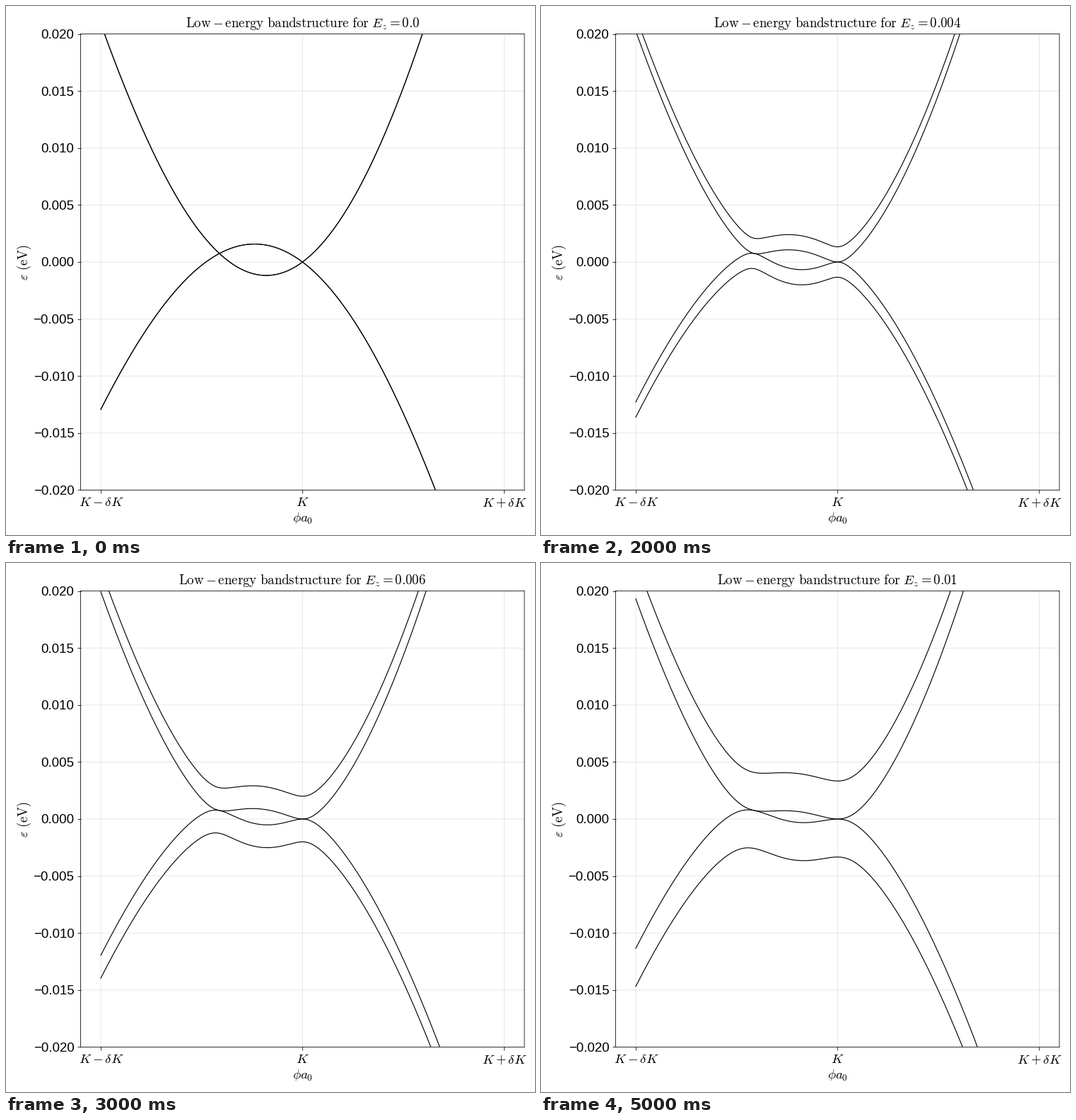
A matplotlib script for the animation above (6 s loop, 748 px wide and 748 px high).

```python
import numpy as np
import matplotlib.pyplot as plt
from matplotlib.animation import FuncAnimation

SIZE, DPI = 748, 100
LEFT, RIGHT, TOP, BOTTOM = 105.5, 733, 39.6, 684.4
MID = (LEFT + RIGHT) / 2
PX = 72 / DPI
FONT = 18.7 * PX
THIN = 0.8 * PX

plt.rcParams["font.family"] = "Liberation Sans"
plt.rcParams["mathtext.fontset"] = "cm"

fig = plt.figure(figsize=(SIZE / DPI, SIZE / DPI), dpi=DPI, facecolor="white")
ax = fig.add_axes([LEFT / SIZE, 1 - BOTTOM / SIZE,
                   (RIGHT - LEFT) / SIZE, (BOTTOM - TOP) / SIZE])
ax.set_xlim(-1.1, 1.1)
ax.set_ylim(-0.02, 0.02)


def label(x, y, text, **kw):
    """Text at a pixel position measured from the top left corner."""
    style = dict(fontsize=FONT, ha="center", va="baseline") | kw
    return fig.text(x / SIZE, 1 - y / SIZE, text, **style)


levels = np.linspace(-0.02, 0.02, 9).round(3) + 0.0
ax.set_xticks([-1, 0, 1], [""] * 3)
ax.set_yticks(levels, [f"{v:.3f}".replace("-", "\u2212") for v in levels])
ax.tick_params(length=5 * PX, width=THIN, pad=4.2 * PX, labelsize=FONT)
ax.grid(color="black", alpha=0.12, linewidth=THIN)
ax.set_axisbelow(True)
for line in [*ax.get_xgridlines(), *ax.get_ygridlines(), *ax.spines.values()]:
    line.set_snap(False)
    line.set_linewidth(THIN)

step = (RIGHT - LEFT) / 2.2
label(MID - step + 0.5, 707.4, r"$K-\delta K$")
label(MID, 707.4, "$K$")
label(MID + step, 707.4, r"$K+\delta K$")
label(MID, 729.4, r"$\phi a_0$")
label(25.5, 362, r"$\varepsilon\ \mathrm{(eV)}$", rotation=90, va="center")
title = label(MID, 30, "", fontsize=18.8 * PX)

# Conduction and valence bands without a field, as polynomials around K
k = np.linspace(-1, 1, 801)
upper = np.polyval([-54.5, -16.3, 586.6, 211.4, 0], k) / 16125
lower = np.polyval([43.7, 17.7, -448.5, -214, 0], k) / 16125
centre, gap = (upper + lower) / 2, (upper - lower) / 2

bands = [ax.plot([], [], color="black", lw=1.15 * PX)[0] for _ in range(4)]
SIGNS = [(1, 1), (1, -1), (-1, 1), (-1, -1)]


def draw(i):
    field = round(0.002 * i, 3)
    split = field / 6
    root = np.hypot(gap, split)
    for line, (s, r) in zip(bands, SIGNS):
        line.set_data(k, centre + s * split + r * root)
    title.set_text(r"$\mathrm{Low-energy\ bandstructure\ for\ }E_z=%s$" % field)
    return [*bands, title]


anim = FuncAnimation(fig, draw, frames=6, interval=1000, repeat=True,
                     repeat_delay=0, init_func=lambda: draw(0))
plt.show()
```
